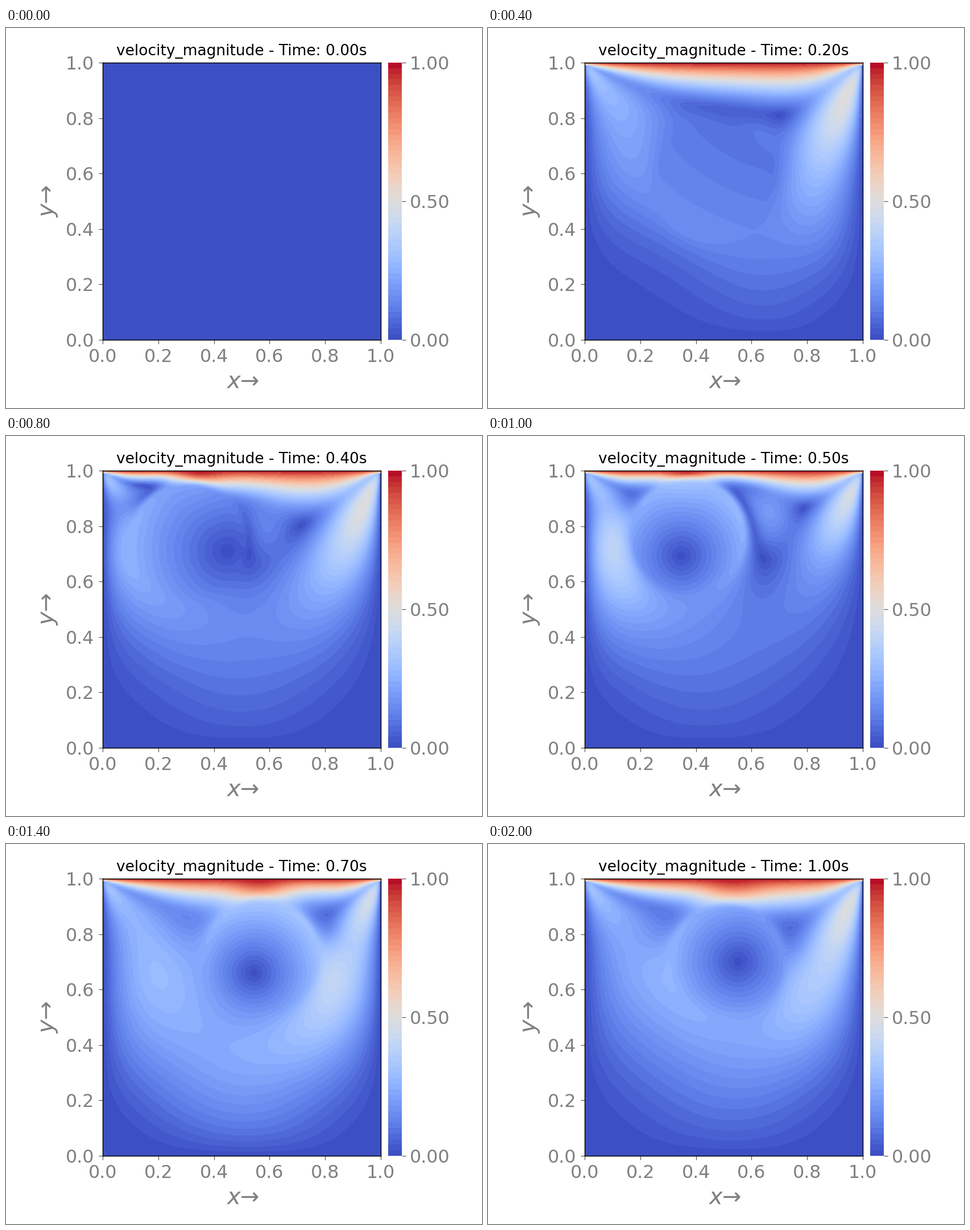
A matplotlib script that plays this animation: 837 by 669 pixels, repeating every 2.2 s.

```python
import numpy as np
import matplotlib.pyplot as plt
from matplotlib.animation import FuncAnimation

# Lid-driven cavity at Re = 100 carrying a rigid disc along a smooth path.
W, H, DPI = 837, 669, 100
FRAMES, INTERVAL = 11, 200
N, NU, LID = 96, 0.01, 1.0
SUBSTEPS = 440
RADIUS = 0.205
h, dt = 1 / N, 1 / SUBSTEPS

KEY_T = np.array([0, 2, 4, 5, 6, 8, 10.0])
KEY_POS = np.array([(.60, .50), (.46, .57), (.31, .75), (.372, .765),
                    (.48, .745), (.60, .68), (.51, .70)])
KEY_VEL = np.array([(0, 0), (-.104, .06), (.03, .10), (.08, -.028),
                    (.10, -.02), (-.025, -.04), (0, .045)])


def path(t):
    """Centre and velocity of the disc (cubic Hermite)."""
    k = min(np.searchsorted(KEY_T, t, side="right") - 1, len(KEY_T) - 2)
    span = KEY_T[k + 1] - KEY_T[k]
    s = (t - KEY_T[k]) / span
    p0, p1 = KEY_POS[k], KEY_POS[k + 1]
    m0, m1 = KEY_VEL[k] * span, KEY_VEL[k + 1] * span
    a = 2 * (p0 - p1) + m0 + m1
    b = 3 * (p1 - p0) - 2 * m0 - m1
    return ((a * s + b) * s + m0) * s + p0, ((3 * a * s + 2 * b) * s + m0) / span


# Cosine modes diagonalise the pressure equation.
modes = np.arange(N)
Q = np.cos(np.pi * np.outer(modes + 0.5, modes) / N) * np.sqrt(2 / N)
Q[:, 0] = np.sqrt(1 / N)
QT = np.ascontiguousarray(Q.T)
eig = 2 * np.cos(np.pi * modes / N) - 2
lam = eig[:, None] + eig[None, :]
lam[0, 0] = 1
inv_lam = 1 / lam
inv_lam[0, 0] = 0

edge = np.arange(N + 1) * h
mid = (np.arange(N) + 0.5) * h


def with_ghosts(u, v, lid):
    U = np.vstack([-u[:1], u, 2 * lid - u[-1:]])
    V = np.hstack([-v[:, :1], v, -v[:, -1:]])
    return U, V


def at_nodes(U, V):
    return (U[1:] + U[:-1]) / 2, (V[:, 1:] + V[:, :-1]) / 2


def advance(u, v):
    U, V = with_ghosts(u, v, LID)
    un, vn = at_nodes(U, V)
    cross = un * vn
    uu = ((u[:, 1:] + u[:, :-1]) / 2) ** 2
    vv = ((v[1:] + v[:-1]) / 2) ** 2
    du = (uu[:, :-1] - uu[:, 1:] + cross[:-1, 1:-1] - cross[1:, 1:-1]) * (dt / h)
    dv = (vv[:-1] - vv[1:] + cross[1:-1, :-1] - cross[1:-1, 1:]) * (dt / h)
    d = NU * dt / h ** 2
    du += d * (u[:, 2:] + u[:, :-2] + U[2:, 1:-1] + U[:-2, 1:-1] - 4 * u[:, 1:-1])
    dv += d * (v[2:] + v[:-2] + V[1:-1, 2:] + V[1:-1, :-2] - 4 * v[1:-1])
    u[:, 1:-1] += du
    v[1:-1] += dv


def cover(dx, dy):
    r = np.sqrt(dx[None, :] ** 2 + dy[:, None] ** 2)
    return np.clip((RADIUS - r) / (1.5 * h) + 0.5, 0, 1)


def add_disc(u, v, t):
    """Make the flow inside the disc rigid, keeping its angular momentum."""
    (cx, cy), (vx, vy) = path(t)
    dy, dx = mid - cy, mid - cx
    cu = cover(edge - cx, dy)
    cv = cover(dx, edge - cy)
    cu[:, [0, -1]] = 0
    cv[[0, -1]] = 0
    su, sv = cu.sum(axis=1), cv.sum(axis=0)
    spin = dx @ (cv * v).sum(axis=0) - dy @ (cu * u).sum(axis=1)
    spin /= su @ dy ** 2 + sv @ dx ** 2
    u += cu * ((vx - spin * dy)[:, None] - u)
    v += cv * ((vy + spin * dx)[None, :] - v)


def project(u, v):
    div = u[:, 1:] - u[:, :-1] + v[1:] - v[:-1]
    p = Q @ ((QT @ div @ Q) * inv_lam) @ QT
    u[:, 1:-1] -= p[:, 1:] - p[:, :-1]
    v[1:-1] -= p[1:] - p[:-1]


def simulate():
    u, v = np.zeros((N, N + 1)), np.zeros((N + 1, N))
    fields = [np.zeros((N + 1, N + 1))]
    for second in range(FRAMES - 1):
        for k in range(SUBSTEPS):
            advance(u, v)
            add_disc(u, v, second + (k + 1) * dt)
            project(u, v)
        speed = np.hypot(*at_nodes(*with_ghosts(u, v, LID)))
        fields.append(np.clip(speed, 0, 0.9999))
    return fields


speeds = simulate()

GRAY, TICK = "gray", "0.35"
TICK_SIZE, LABEL_SIZE, TITLE_SIZE = 22.8, 28.8, 19
levels = np.linspace(0, 1, 51)
cmap = plt.get_cmap("coolwarm")

plt.rcParams["font.family"] = "DejaVu Sans"
# The small excess keeps the pixel size from rounding down.
fig = plt.figure(figsize=((W + 0.01) / DPI, (H + 0.01) / DPI), dpi=DPI,
                 facecolor="white")


def panel(x0, y0, x1, y1):
    return fig.add_axes([x0 / W, 1 - y1 / H, (x1 - x0) / W, (y1 - y0) / H])


def label(x, y, s, size, color=GRAY, angle=0):
    return fig.text(x / W, 1 - y / H, s, fontsize=size, color=color, ha="center",
                    va="baseline", rotation=angle, rotation_mode="anchor")


ax = panel(170, 61, 659, 549)
ax.set(xlim=(0, 1), ylim=(0, 1), facecolor=cmap(0.01))
ticks = np.linspace(0, 1, 6)
names = [f"{t:.1f}" for t in ticks]
ax.set_xticks(ticks, names)
ax.set_yticks(ticks, names)
ax.tick_params(labelsize=TICK_SIZE, labelcolor=GRAY, color=TICK,
               length=4.7, width=0.9, pad=6)
for spine in ax.spines.values():
    spine.set_linewidth(1.05)

bar = panel(671.5, 61, 695.5, 549)
bar.pcolormesh([0, 1], levels, (levels[:-1, None] + levels[1:, None]) / 2,
               cmap=cmap, vmin=0, vmax=1)
bar.set(xlim=(0, 1), ylim=(0, 1), xticks=[])
bar.yaxis.tick_right()
bar.set_yticks([0, 0.5, 1], ["0.00", "0.50", "1.00"])
bar.tick_params(labelsize=TICK_SIZE, labelcolor=GRAY, color=TICK,
                length=5, width=0.9, pad=5)
for spine in bar.spines.values():
    spine.set_visible(False)

label(416, 634, "$x$→", LABEL_SIZE)
label(84, 305, "$y$→", LABEL_SIZE, angle=90)
title = label(414.5, 48, "", TITLE_SIZE, "black")
filled = None


def draw(i):
    global filled
    if filled is not None:
        filled.remove()
    filled = ax.contourf(edge, edge, speeds[i], levels=levels, cmap=cmap,
                         vmin=0, vmax=1)
    title.set_text(f"velocity_magnitude - Time: {i / 10:.2f}s")
    return filled, title


anim = FuncAnimation(fig, draw, frames=FRAMES, init_func=lambda: draw(0),
                     interval=INTERVAL, repeat=True, repeat_delay=0, blit=False)
plt.show()
```
